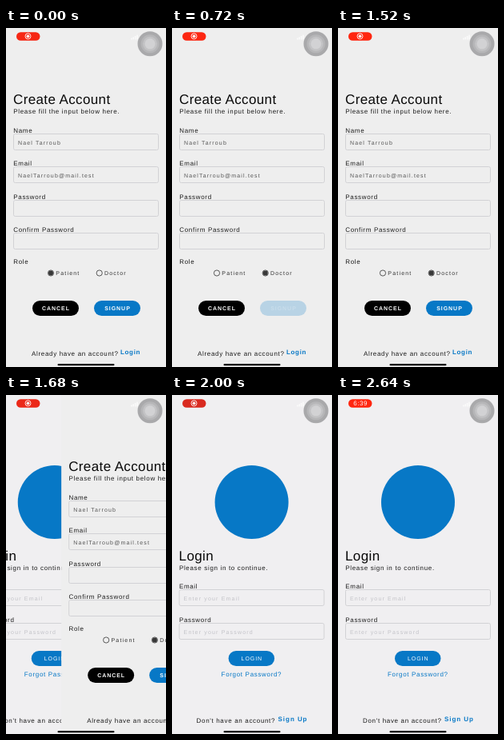
An HTML page with a canvas that plays this animation: 200 px wide and 424 px high, repeating every 2720 ms.

```html
<!DOCTYPE html>
<html lang="en">
<head>
<meta charset="utf-8">
<title>Sign up flow</title>
<style>
  html, body { margin: 0; width: 100%; height: 100%; overflow: hidden; background: #eee; }
  canvas { display: block; width: 200px; height: 424px; }
</style>
</head>
<body>
<canvas id="stage"></canvas>
<script>
const W = 200, H = 424, LOOP = 2720, STEP = 80;
const BLUE = '#0778c6', INK = '#1c1c1c', BG = '#eeeeee';
const FONT = '"Liberation Sans", Arial, sans-serif';

const canvas = document.getElementById('stage');
const ratio = window.devicePixelRatio || 1;
canvas.width = W * ratio;
canvas.height = H * ratio;
const ctx = canvas.getContext('2d');

const clamp = v => Math.min(1, Math.max(0, v));
const mix = (a, b, k) => a + (b - a) * k;
const easeInOut = k => k < 0.5 ? 2 * k * k : 1 - 2 * (1 - k) * (1 - k);
const ramp = (t, start, length) => easeInOut(clamp((t - start) / length));

function text(str, x, y, { size = 8, gap = 0.67, color = INK, weight = 400, center = false } = {}) {
  ctx.font = `${weight} ${size}px ${FONT}`;
  ctx.letterSpacing = gap + 'px';
  ctx.textRendering = 'geometricPrecision';
  ctx.fillStyle = color;
  const left = center ? x - (ctx.measureText(str).width - gap) / 2 : x;
  ctx.fillText(str, left, y);
}

function box(x, y, w, h, r, fill, stroke) {
  ctx.beginPath();
  ctx.roundRect(x, y, w, h, r);
  if (fill) { ctx.fillStyle = fill; ctx.fill(); }
  if (stroke) { ctx.strokeStyle = stroke; ctx.lineWidth = 1; ctx.stroke(); }
}

function disc(x, y, r, fill, stroke, width = 1) {
  ctx.beginPath();
  ctx.arc(x, y, r, 0, Math.PI * 2);
  if (fill) { ctx.fillStyle = fill; ctx.fill(); }
  if (stroke) { ctx.strokeStyle = stroke; ctx.lineWidth = width; ctx.stroke(); }
}

const title = (str, y) => text(str, 9, y, { size: 17, gap: 0.38, color: '#0a0a0a' });

function field(label, y, value, color = '#555') {
  text(label, 9.3, y);
  box(9.5, y + 1.5, 181, 20, 2, null, '#d2d2d5');
  if (value) text(value, 15, y + 14.5, { size: 7, gap: 1.17, color });
}

function button(label, x, y, w, fill, weight, alpha = 1) {
  ctx.globalAlpha = alpha;
  box(x, y, w, 19, 9.5, fill);
  text(label, x + w / 2, y + 12, { size: 7, gap: 0.95, color: '#fff', weight, center: true });
  ctx.globalAlpha = 1;
}

function radio(label, x, selected, dot = '#383838') {
  disc(x, 306.5, 3.6, null, '#333', 0.8);
  if (selected) disc(x, 306.5, 3, dot);
  text(label, x + 6.3, 309.3, { size: 7, gap: 1.2, color: '#333' });
}

function loginPage() {
  ctx.fillStyle = '#f0eff1';
  ctx.fillRect(-W, 0, W * 3, H);
  disc(100, 134, 46, BLUE);
  title('Login', 206.5);
  text('Please sign in to continue.', 9.3, 218.5);
  field('Email', 242, 'Enter your Email', '#c3c3c8');
  field('Password', 284, 'Enter your Password', '#c3c3c8');
  button('LOGIN', 71, 320, 57.5, BLUE, 400);
  text('Forgot Password?', 62, 352, { color: BLUE });
  text("Don't have an account?", 31, 410);
  text('Sign Up', 133, 408, { gap: 0.95, color: BLUE, weight: 700 });
}

function signupPage(t) {
  ctx.fillStyle = BG;
  ctx.fillRect(0, 0, W, H);
  title('Create Account', 95);
  text('Please fill the input below here.', 9.3, 106.5);
  field('Name', 131, 'Nael Tarroub');
  field('Email', 172, 'NaelTarroub@mail.test');
  field('Password', 214);
  field('Confirm Password', 255);
  text('Role', 9.3, 295.3);

  const doctor = t >= 200;
  radio('Patient', 56, !doctor);
  radio('Doctor', 116.7, doctor, t < 480 ? '#2b527c' : '#383838');

  const pressed = ramp(t, 560, 150) - ramp(t, 760, 250);
  button('CANCEL', 33, 341, 58, '#000', 700);
  button('SIGNUP', 110, 341, 58, BLUE, 700, mix(1, 0.23, pressed));
  text('Already have an account?', 32, 409.5);
  text('Login', 143, 407.7, { color: BLUE, weight: 700 });
}

// Critically damped spring, 0 to 1.
function slideProgress(t) {
  const s = Math.max(0, t - 1613) / 1000 * 18.26;
  return 1 - Math.exp(-s) * (1 + s);
}

function statusBar(t) {
  const dim = (1 + Math.cos((t - 340) / 1600 * Math.PI * 2)) / 2;
  const k = clamp((dim - 0.5) * 2);
  box(13, 5.2, 29.5, 10.6, 5.3,
    `rgb(${mix(255, 216, k)}, ${mix(38, 42, k)}, ${mix(16, 32, k)})`);
  if (t < 2400) {
    disc(27.5, 10.3, 3.5, null, '#fff', 0.9);
    disc(27.5, 10.3, 1.9, '#fff');
  } else {
    text('6:39', 27.8, 13.3, { size: 8, gap: 0.5, color: '#fff', weight: 400, center: true });
  }

  for (let i = 0; i < 4; i++) box(156 + i * 2.4, 12.5 - i * 1.3, 1.6, 2 + i * 1.3, 0.4, '#fbfbfb');

  disc(180, 19.8, 15.5, '#a9a9ab');
  disc(180, 19.8, 11.5, '#b6b6b8');
  disc(180, 19.8, 9, '#c3c3c5');
  disc(180, 19.8, 6.5, '#d2d2d4');

  box(64.5, 420, 71, 2.3, 1.15, '#000');
}

function draw(t) {
  ctx.setTransform(ratio, 0, 0, ratio, 0, 0);
  const p = slideProgress(t);

  if (p > 0) {
    ctx.save();
    ctx.translate(-0.3 * W * (1 - p), 0);
    loginPage();
    ctx.restore();
  }
  if (p < 0.998) {
    ctx.save();
    ctx.translate(W * p, 0);
    signupPage(t);
    ctx.restore();
  }
  statusBar(t);
}

function tick() {
  const t = performance.now() % LOOP;
  draw(Math.floor(t / STEP) * STEP);
  requestAnimationFrame(tick);
}
tick();
</script>
</body>
</html>
```
